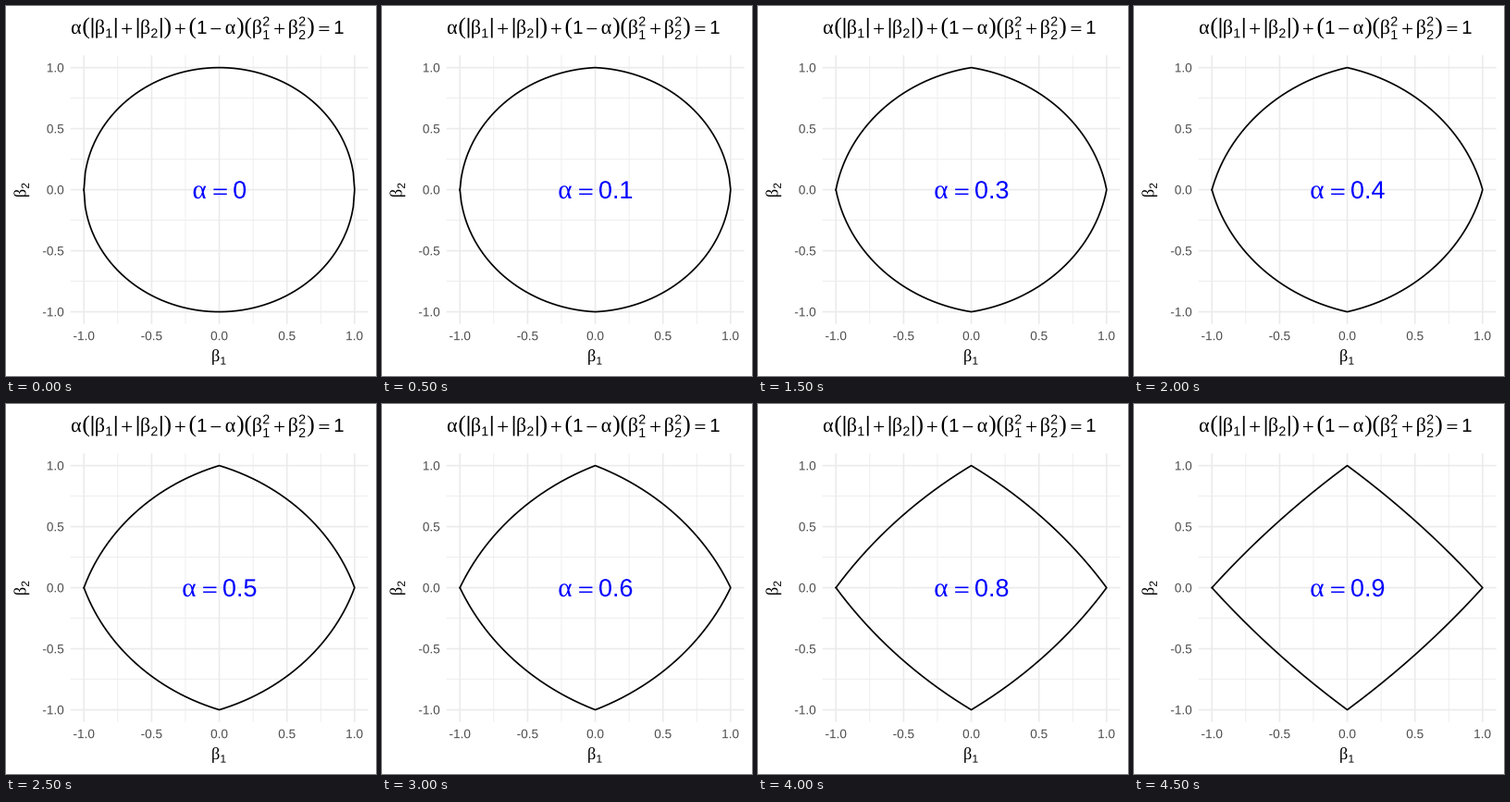
A matplotlib script that plays this animation: 400x400 px, repeating every 5 s.

```python
import numpy as np
import matplotlib.pyplot as plt
from matplotlib.animation import FuncAnimation
from matplotlib.patches import PathPatch
from matplotlib.path import Path
from matplotlib.textpath import TextPath
from matplotlib.transforms import Affine2D

SIZE, DPI = 400, 100
BASE = 17
GRID, TICK, BLUE = "#ebebeb", "#4d4d4d", "#0000ff"
LEFT, RIGHT, TOP, BOTTOM = 69.6, 391.5, 53.4, 343.8
SANS, SERIF = {"family": "Liberation Sans"}, {"family": "Liberation Serif"}

# advances and operator strokes in em; strokes are (x, y, width, height)
ADVANCE = {"α": 0.631, "β": 0.549, "(": 0.416, ")": 0.416, "|": 0.25, ".": 0.278}
STROKES = {
    "+": [(0.01, 0.24, 0.53, 0.057), (0.247, 0, 0.057, 0.533)],
    "−": [(0.01, 0.235, 0.53, 0.057)],
    "=": [(0.01, 0.145, 0.53, 0.057), (0.01, 0.33, 0.53, 0.057)],
    "|": [(0.081, -0.22, 0.085, 1.06)],
}
SPACE = {"+": 0.185, "−": 0.185, "=": 0.231}
SERIF_SCALE = {"α": 1.08, "β": 1.08, "(": 1.25, ")": 1.25}

plt.rcParams["path.snap"] = False


def px(width):
    return width * 72 / DPI


def glyph(ch, x, y, size):
    """Paths of one symbol with its origin at (x, y), y upwards."""
    if ch in STROKES:
        unit = Path.unit_rectangle()
        return [Affine2D().scale(w, h).translate(u, v).scale(size).translate(x, y)
                .transform_path(unit) for u, v, w, h in STROKES[ch]]
    if ch in SERIF_SCALE:
        path = TextPath((0, y), ch, size=size * SERIF_SCALE[ch], prop=SERIF)
        box = path.get_extents()
        dx = x + ADVANCE[ch] * size / 2 - (box.x0 + box.x1) / 2
        return [Affine2D().translate(dx, 0).transform_path(path)]
    return [TextPath((x, y), ch, size=size, prop=SANS)]


def formula(s, size):
    """Path and width of a formula; _ and ^ mark one-character scripts."""
    paths, x, i = [], 0, 0
    while i < len(s):
        if s[i] == "_":
            both = s[i + 2:i + 3] == "^"
            paths += glyph(s[i + 1], x, -size * (0.29 if both else 0.21), 0.7 * size)
            if both:
                paths += glyph(s[i + 3], x, size * 0.42, 0.7 * size)
            x += 0.439 * size
            i += 4 if both else 2
            continue
        gap = SPACE.get(s[i], 0) * size
        paths += glyph(s[i], x + gap, 0, size)
        step = 0.549 if s[i] in SPACE else ADVANCE.get(s[i], 0.556)
        x += step * size + 2 * gap
        i += 1
    return Path.make_compound_path(*paths), x


def place(path, x, y, turn=0):
    move = Affine2D().rotate_deg(turn).translate(x, SIZE - y)
    return move.transform_path(path)


def show(path, color="black"):
    return stage.add_patch(PathPatch(path, fc=color, lw=0))


def tick(v, x, y, align):
    """Tick label whose ink ends at x (align 1) or is centred on it (0.5)."""
    path = TextPath((0, 0), f"{v:.1f}", size=0.8 * BASE, prop=SANS)
    box = path.get_extents()
    show(place(path, x - box.x0 - align * box.width, y), TICK)


def stage_xy(x, y):
    return (LEFT + (x + 1.1) / 2.2 * (RIGHT - LEFT),
            BOTTOM - (y + 1.1) / 2.2 * (BOTTOM - TOP))


fig = plt.figure(figsize=(SIZE / DPI, SIZE / DPI), dpi=DPI, facecolor="white")
stage = fig.add_axes([0, 0, 1, 1], xlim=(0, SIZE), ylim=(0, SIZE))
stage.axis("off")


def draw_grid():
    minor, major = (-0.75, -0.25, 0.25, 0.75), (-1, -0.5, 0, 0.5, 1)
    for values, width in ((minor, 0.8), (major, 1.65)):
        for v in values:
            x, y = stage_xy(v, v)
            style = dict(color=GRID, lw=px(width), solid_capstyle="butt", zorder=0)
            stage.plot([x, x], [SIZE - BOTTOM, SIZE - TOP], **style)
            stage.plot([LEFT, RIGHT], [SIZE - y, SIZE - y], **style)
    for v in major:
        x, y = stage_xy(v, v)
        tick(v, x, 361.2, 0.5)
        tick(v, 62.2, y + 4.8, 1)


def draw_names():
    title, _ = formula("α(|β_1|+|β_2|)+(1−α)(β_1^2+β_2^2)=1", 1.2 * BASE)
    show(place(title, LEFT, 30))
    mid_x, mid_y = stage_xy(0, 0)
    path, width = formula("β_1", BASE)
    show(place(path, mid_x - width / 2, 384))
    path, width = formula("β_2", BASE)
    show(place(path, 21.3, mid_y + width / 2, 90))


draw_grid()
draw_names()
curve, = stage.plot([], [], color="black", lw=px(1.7), solid_joinstyle="round")
label = show(Path(np.zeros((1, 2))), BLUE)


def outline(a):
    """Solve a(|x| + |y|) + (1 - a)(x² + y²) = 1 for y along x."""
    x = np.linspace(-1, 1, 201)
    c = a * np.abs(x) + (1 - a) * x**2 - 1
    y = (-a + np.sqrt(a * a - 4 * (1 - a) * c)) / (2 * (1 - a))
    return np.r_[x, x[::-1]], np.r_[y, -y[::-1]]


def update(i):
    a = i / 10
    x, y = stage_xy(*outline(a))
    curve.set_data(x, SIZE - y)
    path, width = formula(f"α={a:g}", 27)
    label.set_path(place(path, stage_xy(0, 0)[0] - width / 2, 208))
    return curve, label


anim = FuncAnimation(fig, update, frames=10, interval=500, repeat=True)
plt.show()
```
